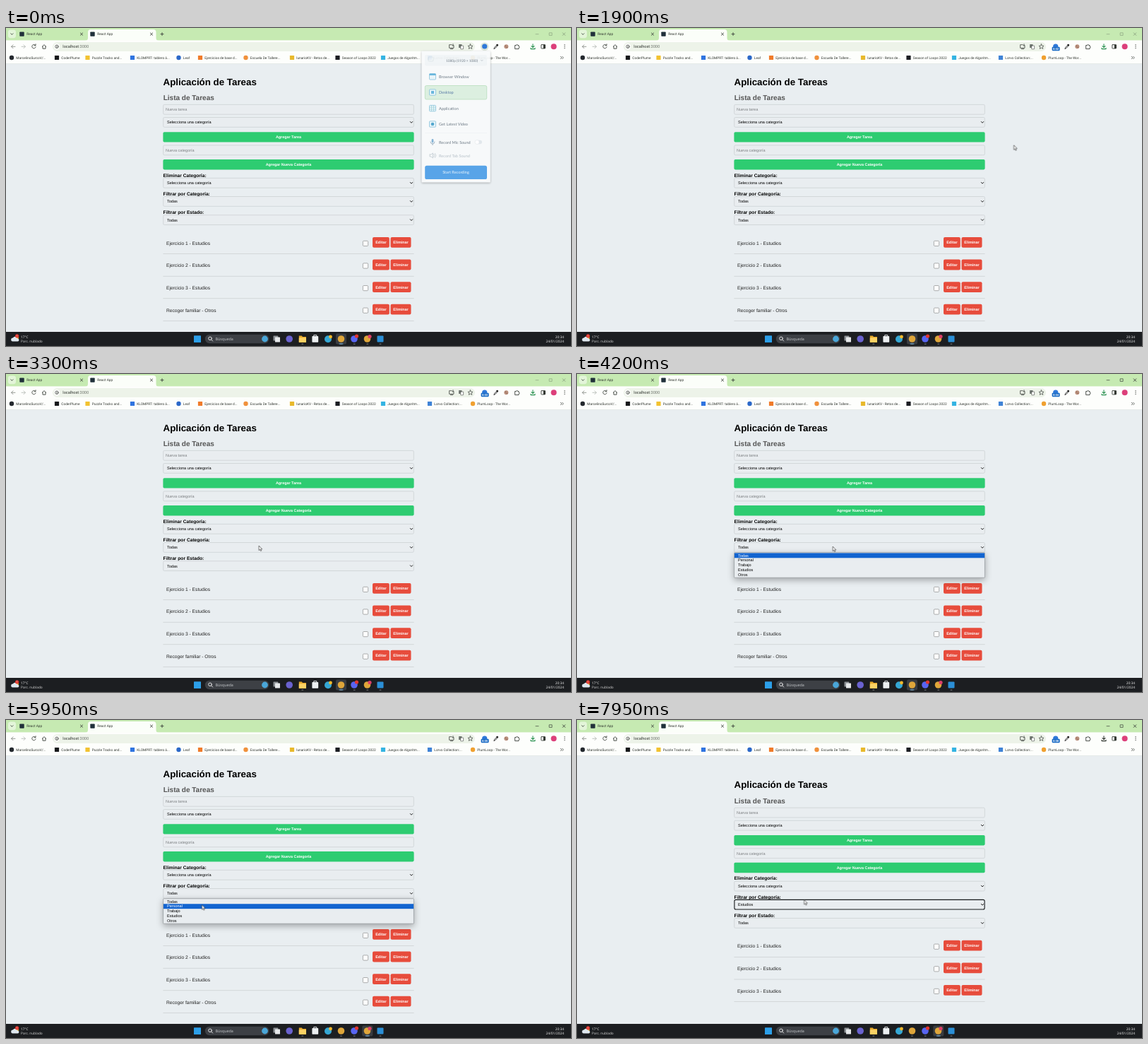
Animation of 800 by 450 pixels, one loop 8000 ms. Source, as an HTML page:

```html
<!DOCTYPE html>
<html lang="es">
<head>
<meta charset="utf-8">
<title>Aplicación de Tareas</title>
<style>
html, body { margin: 0; width: 100%; height: 100%; overflow: hidden; background: #e9eef1; }
svg { display: block; width: 100vw; height: 100vh; }
text { text-rendering: geometricPrecision; white-space: pre; }
.page text { font-family: "Liberation Sans", Arial, sans-serif; font-size: 5.56px; }
.page .h1 { font-size: 13.33px; font-weight: 700; }
.page .h2 { font-size: 10px; font-weight: 700; fill: #555; }
.page .label { font-size: 6.667px; font-weight: 700; }
.page .task { font-size: 6.667px; fill: #222; }
.page .btn { font-size: 5.4px; font-weight: 700; fill: #fff; text-anchor: middle; }
.page .hint { fill: #7d8083; }
.ui text { font-family: Roboto, sans-serif; font-size: 4.8px; fill: #30352f; }
.ui .url { font-size: 5.6px; }
.ui .badge { font-size: 4px; font-weight: 700; fill: #fff; text-anchor: middle; }
.bar text { font-family: "Open Sans", sans-serif; font-size: 4.8px; fill: #f2f2f2; }
.popup text { font-family: Lato, sans-serif; font-size: 5.6px; fill: #66737f; }
.line { fill: none; stroke: #3c413b; stroke-width: .9; stroke-linecap: round; stroke-linejoin: round; }
.menu { filter: drop-shadow(0 3px 5px rgba(0,0,0,.32)); }
.popup { filter: drop-shadow(0 1px 1.5px rgba(0,0,0,.3)); animation: fade 8s step-end infinite; }
.content { animation: recenter 8s step-end infinite; }
.cursor { animation: move 8s linear infinite; }
@keyframes fade {
  0% { opacity: .94; } 1.875% { opacity: .7; } 2.5% { opacity: .42; }
  3.125% { opacity: .16; } 3.75%, 100% { opacity: 0; }
}
@keyframes recenter {
  0% { transform: none; } 85% { transform: translateY(15.8px); } 100% { transform: translateY(15.8px); }
}
</style>
</head>
<body>
<script>
const LOOP = 8000, PICK = 6800, OPEN = 3950;
let css = '', spans = 0;
const pct = ms => ms / LOOP * 100 + '%';

// markup helpers
const rect = (x, y, w, h, fill, r = 0, more = '') =>
  `<rect x="${x}" y="${y}" width="${w}" height="${h}" rx="${r}" fill="${fill}" ${more}/>`;
const dot = (x, y, r, fill, more = '') => `<circle cx="${x}" cy="${y}" r="${r}" fill="${fill}" ${more}/>`;
const text = (x, y, s, cls = '', more = '') => `<text x="${x}" y="${y}" class="${cls}" ${more}>${s}</text>`;
const line = (d, more = '') => `<path class="line" d="${d}" ${more}/>`;
const group = (cls, ...parts) => `<g class="${cls}">${parts.join('')}</g>`;

// content visible only from a to b
function span(a, b, body) {
  const id = 'span' + spans++;
  css += `@keyframes ${id}{0%{visibility:${a ? 'hidden' : 'visible'}}` +
    (a ? `${pct(a)}{visibility:visible}` : '') +
    (b < LOOP ? `${pct(b)}{visibility:hidden}100%{visibility:hidden}` : '100%{visibility:visible}') + '}';
  return `<g style="animation:${id} 8s step-end infinite">${body}</g>`;
}

// ---- web page ----
const field = (y, body = '', border = '#c3c8cb') =>
  rect(222.7, y, 354.6, 13.8, '#e9edf0', 1.6, `stroke="${border}" stroke-width=".6"`) + body;
const input = (y, hint) => field(y, text(226, y + 8.8, hint, 'hint'));
const chevron = y => line(`M572.3 ${y + 6}l1.7 1.8 1.7-1.8`, 'style="stroke:#111"');
const select = (y, value) => field(y, text(228, y + 8.9, value) + chevron(y));
const wide = (y, label) => rect(222.4, y, 355.2, 14.4, '#2ecc71', 1.8) + text(400, y + 9.2, label, 'btn');

function task(i, name) {
  const y = 296 + i * 31.6;
  return text(227, y + 10.7, name, 'task') +
    rect(505.4, y + 5.3, 7.2, 7.2, '#fff', 1.2, 'stroke="#777" stroke-width=".6"') +
    rect(519, y, 23.8, 14.8, '#e74c3c', 2) + text(530.9, y + 9.3, 'Editar', 'btn') +
    rect(544.5, y, 29, 14.8, '#e74c3c', 2) + text(559, y + 9.3, 'Eliminar', 'btn') +
    rect(222.4, y + 23.3, 355.2, .6, '#c4c8ca');
}

const focused = rect(222.9, 238.6, 354.2, 13.6, '#e9edf0', 2, 'stroke="#15181a" stroke-width="1.1"') +
  text(228, 247.4, 'Estudios') + chevron(238.5);

const content = group('page content',
  text(222.5, 80.5, 'Aplicación de Tareas', 'h1'),
  text(222.7, 102, 'Lista de Tareas', 'h2'),
  input(108.4, 'Nueva tarea'),
  select(126.5, 'Selecciona una categoría'),
  wide(147.2, 'Agregar Tarea'),
  input(166, 'Nueva categoría'),
  wide(186, 'Agregar Nueva Categoría'),
  text(222.6, 210.6, 'Eliminar Categoría:', 'label'),
  select(212.4, 'Selecciona una categoría'),
  text(222.6, 236.8, 'Filtrar por Categoría:', 'label'),
  span(0, PICK, select(238.5, 'Todas')),
  span(PICK, LOOP, focused),
  text(222.6, 263, 'Filtrar por Estado:', 'label'),
  select(264.7, 'Todas'),
  ['Ejercicio 1 - Estudios', 'Ejercicio 2 - Estudios', 'Ejercicio 3 - Estudios'].map((s, i) => task(i, s)).join(''),
  span(0, PICK, task(3, 'Recoger familiar - Otros')));

// ---- dropdown list ----
const options = ['Todas', 'Personal', 'Trabajo', 'Estudios', 'Otros'];
const hover = [OPEN, 5870, 6190, 6500, PICK];
const optionY = i => 253.4 + i * 6.86;
const menu = group('page',
  span(OPEN, PICK, group('menu', rect(222.6, 252.8, 354.8, 35.4, '#e9edf0', .6, 'stroke="#858a8e" stroke-width=".6"'))),
  span(OPEN, PICK, options.map((s, i) => text(228, optionY(i) + 5.2, s)).join('')),
  options.slice(0, 4).map((s, i) => span(hover[i], hover[i + 1],
    rect(222.9, optionY(i), 354.2, 6.9, '#1264d0') + text(228, optionY(i) + 5.2, s, '', 'fill="#fff"'))).join(''));

// ---- browser frame ----
const cross = (x, y, r = 1.6) => line(`M${x - r} ${y - r}l${2 * r} ${2 * r}m0 ${-2 * r}l${-2 * r} ${2 * r}`, 'stroke-width=".7"');
const controls = color => `<g style="opacity:${color}">` +
  line('M750 8.7h4M769.5 6.8h3.6v3.6h-3.6z', 'style="stroke-width:.7"') + cross(790, 8.6, 1.8) + '</g>';

const marks = [
  [8, '#24292e', 'MarcelinoSurcoV/...', 'o'], [72, '#17191b', 'CoderPlume'],
  [115.5, '#f2c230', 'Puzzle Tracks and...'], [179, '#2f74e0', 'KLOMPRT: tablero á...'],
  [244.5, '#2b68c8', 'Leaf', 'o'], [275, '#f07b2a', 'Ejercicios de base d...'],
  [339.5, '#f0913c', 'Escuela De Tallere...', 'o'], [405, '#e8b92c', 'lunarioKV - Retos de...'],
  [469.5, '#1b1d22', 'Season of Loops 2022'], [534, '#35b4e2', 'Juegos de Algoritm...'],
  [600, '#3f83d6', 'Lorvo Collection:...'], [661, '#f0a030', 'PlumLoop - The Wor...', 'o']
];
const mark = ([x, color, name, round]) =>
  (round ? dot(x, 42, 3.2, color) : rect(x - 3.1, 38.9, 6.2, 6.2, color, .6)) + text(x + 6.3, 43.7, name);

const download = color => line('M746 22.8v4.6m-2-1.8l2 2 2-2M743 28.2v1.4h6v-1.4', `style="stroke:${color};stroke-width:1.1"`);
const clock = [500, 1800, 2500, 3950, 4900, 6200, 7200, 7900, LOOP];

const browser = group('ui',
  rect(0, 0, 800, 20, '#c6eab2'),
  rect(3, 2.6, 11, 11.6, '#e3f5d9', 3.4), line('M6.8 7.8l1.6 1.6 1.6-1.6'),
  `<path d="M112 18q4 0 4-4V6q0-4 4-4h88.500q4 0 4 4v8q0 4 4 4z" fill="#fbfef9"/>`,
  rect(0, 17.4, 800, 33, '#fdfefc'), rect(0, 50, 800, .6, '#dfe5df'),
  [22.5, 122.5].map(x => rect(x - 3.2, 5.4, 6.4, 6.4, '#20303a', .8) + text(x + 6.8, 10.4, 'React App')).join(''),
  cross(107, 8.6), cross(206, 8.6), line('M219 8.6h4m-2-2v4'),
  span(0, OPEN, controls(.42)), span(OPEN, LOOP, controls(1)),
  line('M13 26.300H7.600m2.400-2.400l-2.400 2.400 2.400 2.400', 'style="stroke:#8b908a"'),
  line('M22 26.300h5.400m-2.400-2.400l2.400 2.400-2.400 2.400', 'style="stroke:#b9beb8"'),
  line('M41.500 24.300a2.700 2.700 0 1 0 .6 2.600M42 22.800v2h-2'),
  line('M51.300 26.300l2.700-2.600 2.700 2.600M52 26v3.200h4V26'),
  rect(66, 20, 598, 13, '#edf3e9', 6.5),
  dot(72, 26.300, 4.3, '#fdfefc'), dot(72, 26.300, 2.3, 'none', 'class="line" style="stroke-width:.7"'), line('M72 26.200v1.200M72 25v0'),
  text(80.300, 28.300, 'localhost<tspan fill="#6d746b">:3000</tspan>', 'url'),
  line('M634 25.500v2.800h-6.400v-4.600h3.600M629.300 29.600h3.400M633 22.700v2.600m-1-1l1 1 1-1', 'style="stroke-width:.8"'),
  rect(641, 23, 4.4, 5, '#737a75', .6), rect(643.6, 25, 4, 4.8, '#fdfefc', .5, 'class="line" style="stroke-width:.6;fill:#fff"'),
  line('M657.500 22.800l1 2.300 2.500.2-1.900 1.600.6 2.500-2.200-1.300-2.200 1.300.6-2.500-1.900-1.600 2.500-.2z', 'style="stroke-width:.7"'),
  span(0, 300, dot(677.7, 26.3, 5.8, '#dce5da')),
  dot(677.7, 26, 3.6, '#2f78d8'),
  clock.slice(0, -1).map((t, i) => span(t, clock[i + 1],
    rect(672.6, 26.8, 11, 5.4, '#1769c4', 1.1) + text(678.1, 31, '0:0' + (i + 1), 'badge'))).join(''),
  line('M691 29.200l.5-1.500 3.200-3.200 1 1-3.200 3.200z', 'style="stroke:#222"'), dot(695.6, 24.2, 1.4, '#222'),
  dot(708.3, 26.3, 3, '#b98f7c'), dot(707.4, 25.5, .5, '#6a4638'), dot(709.2, 27.2, .5, '#6a4638'),
  line('M721 24.500h1.600a1 1 0 1 1 2 0h1.400v1.600a1 1 0 1 1 0 2v1.500h-5z', 'style="stroke-width:.9"'),
  span(0, 7200, download('#2a9150')), span(7200, LOOP, download('#30352f')),
  rect(757.8, 23.6, 5.6, 5.4, 'none', .5, 'class="line"'), rect(760.8, 23.6, 2.8, 5.4, '#30352f'),
  dot(775.6, 26.3, 4, '#dc3f7a'),
  [24, 26.3, 28.6].map(y => dot(791, y, .65, '#30352f')).join(''),
  marks.map(mark).join(''),
  line('M785.300 40.300l1.600 1.700-1.600 1.700m2.400-3.400l1.600 1.700-1.600 1.700', 'style="stroke-width:.7"'));

// ---- recorder popup ----
const row = (y, s, more) => text(613, y + 2, s, '', more);
const frameIcon = y => rect(599.5, y - 4.2, 9, 8.4, '#e8f5fa', 1, 'stroke="#72b7d4" stroke-width=".7"');
const popup = group('popup',
  rect(588.5, 32.5, 97.3, 186, '#f8fafb', 1),
  rect(593, 38, 88, 15.5, '#f1f5f7', 2),
  rect(598, 41, 7, 6, 'none', 1, 'stroke="#d0dae0" stroke-width=".6"'),
  text(623, 48.4, '1080p (1920 × 1080)', '', 'style="font-size:4.8px"'),
  line('M672.500 45.300l1.300 1.300 1.300-1.300', 'style="stroke:#9aa5ad;stroke-width:.6"'),
  rect(593.3, 81.5, 87.4, 19.5, '#dcf0df', 2, 'stroke="#a5d5aa" stroke-width=".6"'),
  [68.8, 91, 113.6, 136].map(frameIcon).join(''),
  rect(599.5, 64.6, 9, 2.4, '#62b4dc', .8),
  rect(602, 89, 4, 4, '#62b4dc'),
  line('M602.500 109.500v8.200m3-8.200v8.200m-6-5.600h9m-9 3h9', 'style="stroke:#8fcad2;stroke-width:.6"'),
  dot(604, 136, 2.3, '#4aa3cc'),
  row(68.8, 'Browser Window'), row(91, 'Desktop', 'style="fill:#4b6fa0"'), row(113.6, 'Application'), row(136, 'Get Latest Video'),
  rect(593, 148, 88, .4, '#e5ebee'),
  rect(602.6, 157, 2.8, 5.4, '#7fb0d4', 1.4), line('M601 161q0 3 3 3t3-3M604 164v1.600', 'style="stroke:#7f98ac;stroke-width:.7"'),
  row(161.5, 'Record Mic Sound'),
  rect(664.5, 158.8, 9.5, 5.4, '#e2e8ec', 2.7), dot(667, 161.5, 3, '#fff', 'stroke="#d8dfe4" stroke-width=".4"'),
  line('M600 179v3h2l2.400 2v-7l-2.400 2zM606 178.500q1.600 2 0 4m1.600-5q2.600 3 0 6', 'style="stroke:#b5c0c8;stroke-width:.7"'),
  row(180.5, 'Record Tab Sound', 'style="fill:#b3bdc5"'),
  rect(593.2, 194.8, 87.8, 19.2, '#4fa0e8', 2.6),
  text(637, 206.4, 'Start Recording', '', 'text-anchor="middle" style="fill:#eef7ff"'));

// ---- taskbar ----
const active = x => rect(x - 7.5, 432.600, 15, 14.800, '#393c41', 2) + rect(x - 3, 446.6, 6, 1, '#6cb8e8', .5);
const alert = (x, y) => dot(x, y, 2.6, '#e0362f');
const taskbar = group('bar',
  rect(0, 430, 800, 20, '#1c1e21'),
  dot(15, 438.5, 2.8, '#f2b632'),
  '<path d="M9.500 443.500a2.500 2.500 0 0 1 .3-5 3.500 3.500 0 0 1 6.500 1 2 2 0 0 1 .2 4z" fill="#dfe8ef"/>',
  alert(15.6, 435.8), text(15.6, 437.2, '1', '', 'text-anchor="middle" style="font-size:3.6px"'),
  text(21, 438.6, '17°C'), text(21, 445, 'Parc. nublado', '', 'style="fill:#d4d4d4"'),
  rect(266, 435.2, 10, 9.8, '#2c9fe8', .6),
  rect(281.8, 433.8, 90.6, 12.4, '#3d4045', 6.2),
  dot(289, 439.3, 2.3, 'none', 'class="line" style="stroke:#f0f0f0"'), line('M290.800 441.100l1.900 1.900', 'style="stroke:#f0f0f0"'),
  text(296.5, 441.9, 'Búsqueda', '', 'style="font-size:5.4px;fill:#c9cbce"'),
  dot(366.5, 440, 4.4, '#4aa6d8'),
  rect(378.5, 435.5, 6.8, 7, '#8c9094', .6), rect(381, 437.5, 7, 7, '#e6e8ea', .6),
  dot(401.2, 440, 4.8, '#6a62cf'),
  span(0, 4250, active(474.5)), span(4250, LOOP, active(511.8)),
  [419.8, 474.5, 493.2, 511.8, 530].map(x => rect(x - 1.5, 446.7, 3, .8, '#9a9da1', .4)).join(''),
  '<path d="M414.800 435.500h4l1.200 1.400h5v8h-10.200z" fill="#e7a92a"/>', rect(414.8, 438.3, 10.2, 6.5, '#fbd265', .6),
  rect(433.4, 436, 8.8, 8.8, '#eceff1', .8), line('M435.800 436v-1.500h4v1.500', 'style="stroke:#eceff1"'),
  dot(456, 440.2, 5, '#35a7d4'), dot(459.5, 437, 2.4, '#f0b92c'),
  dot(474.5, 440, 4.8, '#dfa63a'),
  dot(493, 440, 4.8, '#5865f2'), alert(496.5, 436),
  dot(511.5, 440, 4.8, '#dfa63a'), dot(515, 436.6, 2.6, '#dc3f6a'),
  rect(525.5, 435.5, 9, 9, '#2b8fd6', 1),
  text(790, 438.6, '20:34', '', 'text-anchor="end"'), text(790, 445, '24/01/2024', '', 'text-anchor="end"'));

// ---- pointer: [ms, x, y] ----
const path = [
  [0, 640, 200], [500, 640, 200], [1050, 632.5, 162.3], [1300, 629, 163], [1800, 629, 163],
  [2550, 340, 238.4], [2650, 340, 238.4], [3450, 362.2, 244], [4200, 362.2, 244],
  [4550, 352, 246.5], [4900, 352, 246.5], [5350, 287.2, 257.5], [5650, 285, 257.5], [5750, 285, 257.5],
  [6550, 254.7, 273.6], [7200, 254.7, 273.6], [7950, 321.6, 254.4], [LOOP, 321.6, 254.4]
];
css += '@keyframes move{' + path.map(([t, x, y]) =>
  `${pct(t)}{transform:translate(${x}px,${y}px);animation-timing-function:${t === 1800 ? 'ease-in-out' : 'linear'}}`).join('') + '}';
const cursor = span(500, LOOP, group('cursor',
  '<path d="M0 0V6.600l1.500-1.400 1 2.400 1.100-.5-1-2.300h2z" fill="#fff" stroke="#222" stroke-width=".6" stroke-linejoin="round"/>'));

document.body.innerHTML = '<svg viewBox="0 0 800 450" preserveAspectRatio="none">' +
  rect(0, 0, 800, 450, '#e9eef1') + content + menu + browser + popup + taskbar + cursor + '</svg>';
document.head.appendChild(document.createElement('style')).textContent = css;
</script>
</body>
</html>
```
